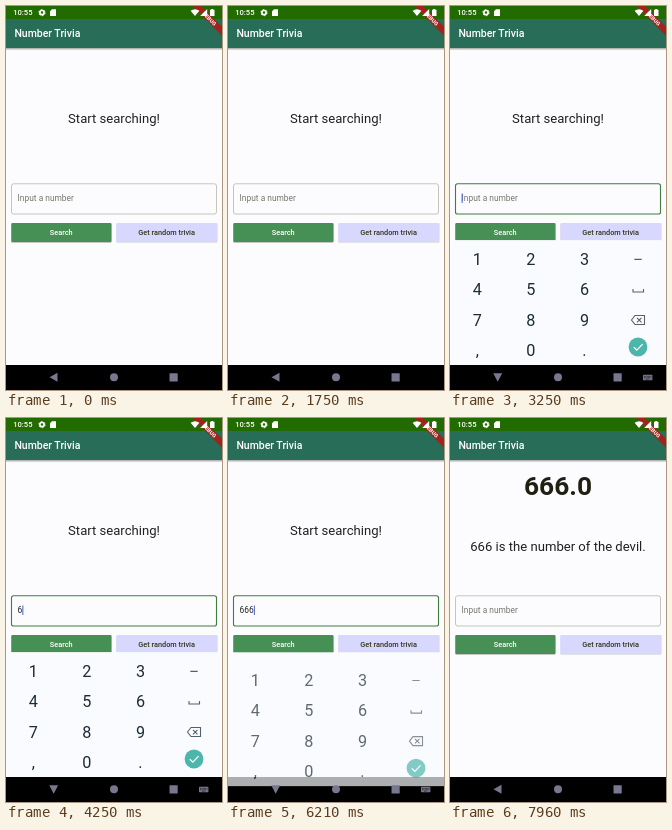
An HTML page that plays this animation: 216x384 px, repeating every 8 s.

```html
<!DOCTYPE html>
<html lang="en">
<head>
<meta charset="utf-8">
<title>Number Trivia</title>
<style>
html, body { margin: 0; height: 100%; overflow: hidden; background: #fcfcff; }
svg { display: block; width: 100vw; height: 100vh; font-family: Roboto, sans-serif; }
.mid { text-anchor: middle; }
.semi { font-weight: 500; }
.field { font-size: 8.4px; }
.button { font-size: 7.35px; font-weight: 500; text-anchor: middle; }
.body { font-size: 13.1px; fill: #202020; text-anchor: middle; }
.line { fill: none; stroke: #57606a; stroke-width: 1.1; }
</style>
</head>
<body>
<svg viewBox="0 0 216 384">
  <defs>
    <linearGradient id="shade" x2="0" y2="1">
      <stop stop-color="#77776a" stop-opacity=".65"/>
      <stop offset="1" stop-color="#77776a" stop-opacity="0"/>
    </linearGradient>
  </defs>
  <rect width="216" height="384" fill="#fcfcff"/>

  <!-- page -->
  <text id="start" class="body" x="108" y="117">Start searching!</text>
  <g id="result">
    <text class="mid" x="108" y="77" font-size="26.3" font-weight="700" fill="#202012">666.0</text>
    <text class="body" x="108" y="132.5">666 is the number of the devil.</text>
  </g>
  <circle id="spinner" cx="108" cy="112" r="8.4" fill="none" stroke="#2e7d32" stroke-width="2.1"/>
  <rect id="box" x="5.5" y="177.8" width="205" height="30.2" rx="2.1" fill="none"/>
  <text id="hint" class="field" x="11.6" y="195.2" fill="#77776c">Input a number</text>
  <text id="typed" class="field" x="11.6" y="195.2" fill="#202020"></text>
  <rect id="cursor" y="187.5" width="1" height="9.5" fill="#3d62d8"/>
  <g>
    <rect x="5.3" y="218" width="100.2" height="19" rx="1.2" fill="#000" opacity=".22"/>
    <rect x="5.3" y="217" width="100.2" height="19" rx="1" fill="#479055"/>
    <text class="button" x="55.2" y="229" fill="#fff">Search</text>
    <rect x="110.3" y="218" width="101.2" height="19" rx="1.2" fill="#000" opacity=".1"/>
    <rect x="110.3" y="217" width="101.2" height="19" rx="1" fill="#d8d8ff"/>
    <text class="button" x="160.6" y="229" fill="#33331c">Get random trivia</text>
  </g>
  <rect id="inset" y="234.3" width="216" height="125" fill="#fcfcff"/>

  <!-- bars -->
  <rect y="42" width="216" height="2.6" fill="url(#shade)"/>
  <rect width="216" height="42" fill="#276d57"/>
  <rect width="216" height="13" fill="#226b00"/>
  <text class="semi" x="8.4" y="31.2" font-size="10.5" fill="#fff">Number Trivia</text>
  <g transform="translate(216) rotate(45)">
    <rect x="-21" y="14.7" width="42" height="6.3" fill="#a3231c"/>
    <text class="mid" y="19.8" font-size="5.36" font-weight="900" fill="#f4eeee">DEBUG</text>
  </g>
  <g fill="#fff">
    <text class="semi" x="7.2" y="9.3" font-size="7.6">10:55</text>
    <circle cx="36" cy="6.6" r="2.1" fill="none" stroke="#fff" stroke-width="1.7"/>
    <circle cx="36" cy="6.6" r="3.1" fill="none" stroke="#fff" stroke-dasharray="1.62"/>
    <path d="M46 3.3H50V10H44V5.3Z"/>
    <path d="M184.6 4.8Q189 1.5 193.4 4.8L189 10Z"/>
    <path d="M201.2 3V10H194.2Z"/>
    <path d="M204 3.8H205.3V3H207.2V3.8H208.5V10H204Z"/>
  </g>
  <rect y="359" width="216" height="25"/>

  <!-- keyboard -->
  <g id="keys">
    <rect y="234.3" width="216" height="124.7" fill="#fafbfe"/>
    <g id="digits" class="mid" font-size="16.2" fill="#1c2b36"></g>
    <path class="line" d="M184.3 253.4H191.7M183 283V286H193.5V283"/>
    <path class="line" d="M181.5 314L185 309.5H194.5V318.5H185ZM187 311.8L191.5 316.3M191.5 311.8L187 316.3"/>
    <circle cx="188" cy="341" r="9.4" fill="#4db6ac"/>
    <path d="M183.8 341.2L186.8 344.2L192.6 338.2" fill="none" stroke="#fff" stroke-width="1.2"/>
  </g>
  <g fill="#77778f">
    <path id="back" d="M43.5 371.3L51.5 366.8V375.8Z"/>
    <circle cx="108" cy="371.3" r="4"/>
    <rect x="163.5" y="367.2" width="8.2" height="8.2" rx=".5"/>
    <g id="switcher">
      <rect x="193" y="368.8" width="9.4" height="5.4" rx=".6"/>
      <path d="M194.2 370.4H201.4M194.2 371.8H201.4M196 373.2H199.6" stroke="#000" stroke-width=".7" stroke-dasharray=".8 .5"/>
    </g>
  </g>
</svg>
<script>
const LOOP = 8000, FOCUS = 2830, CLOSE = 6150, CLEAR = 6290, DONE = 6900;
const TAPS = [3900, 4320, 4740];
const $ = id => document.getElementById(id);
const show = (id, on) => $(id).style.display = on ? '' : 'none';
const set = (id, attrs) => {
  for (const k in attrs) $(id).setAttribute(k, attrs[k]);
};
const clamp = v => Math.max(0, Math.min(1, v));

$('digits').innerHTML = ['1', '2', '3', '4', '5', '6', '7', '8', '9', ',', '0', '.']
  .map((c, i) => `<text x="${27.3 + i % 3 * 53.6}" y="${259 + Math.floor(i / 3) * 30.3}">${c}</text>`)
  .join('');

function draw(t) {
  const focused = t >= FOCUS && t < CLEAR;
  const loading = t >= CLEAR && t < DONE;
  const count = focused ? TAPS.filter(tap => t >= tap).length : 0;

  show('start', t < CLEAR);
  show('spinner', loading);
  show('result', t >= DONE);
  show('hint', !count);
  $('typed').textContent = '6'.repeat(count);
  set('box', { stroke: focused ? '#3f7f3c' : '#a0a08c', 'stroke-width': focused ? 1.1 : .6 });

  // The blink restarts with every typed digit
  const since = t - (count ? TAPS[count - 1] : FOCUS);
  show('cursor', focused && since % 1000 < 520);
  set('cursor', { x: 11.6 + count * 4.75 });

  // Keyboard rises and fades in, then sinks and fades out
  const enter = 1 - (1 - clamp((t - FOCUS) / 250)) ** 3;
  const leave = clamp((t - CLOSE) / 180);
  const open = t >= FOCUS && leave < 1;
  show('keys', open);
  set('keys', {
    transform: `translate(0 ${25 * (1 - enter) + 27 * leave})`,
    opacity: enter * (1 - .9 * leave)
  });
  show('inset', t > FOCUS + 200 && t < CLEAR);
  show('switcher', open);
  set('back', { d: open ? 'M43.2 367.2H52.2L47.7 375.8Z' : 'M43.5 371.3L51.5 366.8V375.8Z' });

  if (loading) {
    const s = (t - CLEAR) / 1333;
    const arc = 4 + 34 * Math.sin(Math.PI * s) ** 2;
    set('spinner', {
      'stroke-dasharray': `${arc} 60`,
      transform: `rotate(${s * 420 - 90} 108 112)`
    });
  }
}

const begin = performance.now();
function tick() {
  draw((performance.now() - begin) % LOOP);
  requestAnimationFrame(tick);
}
tick();
</script>
</body>
</html>
```
